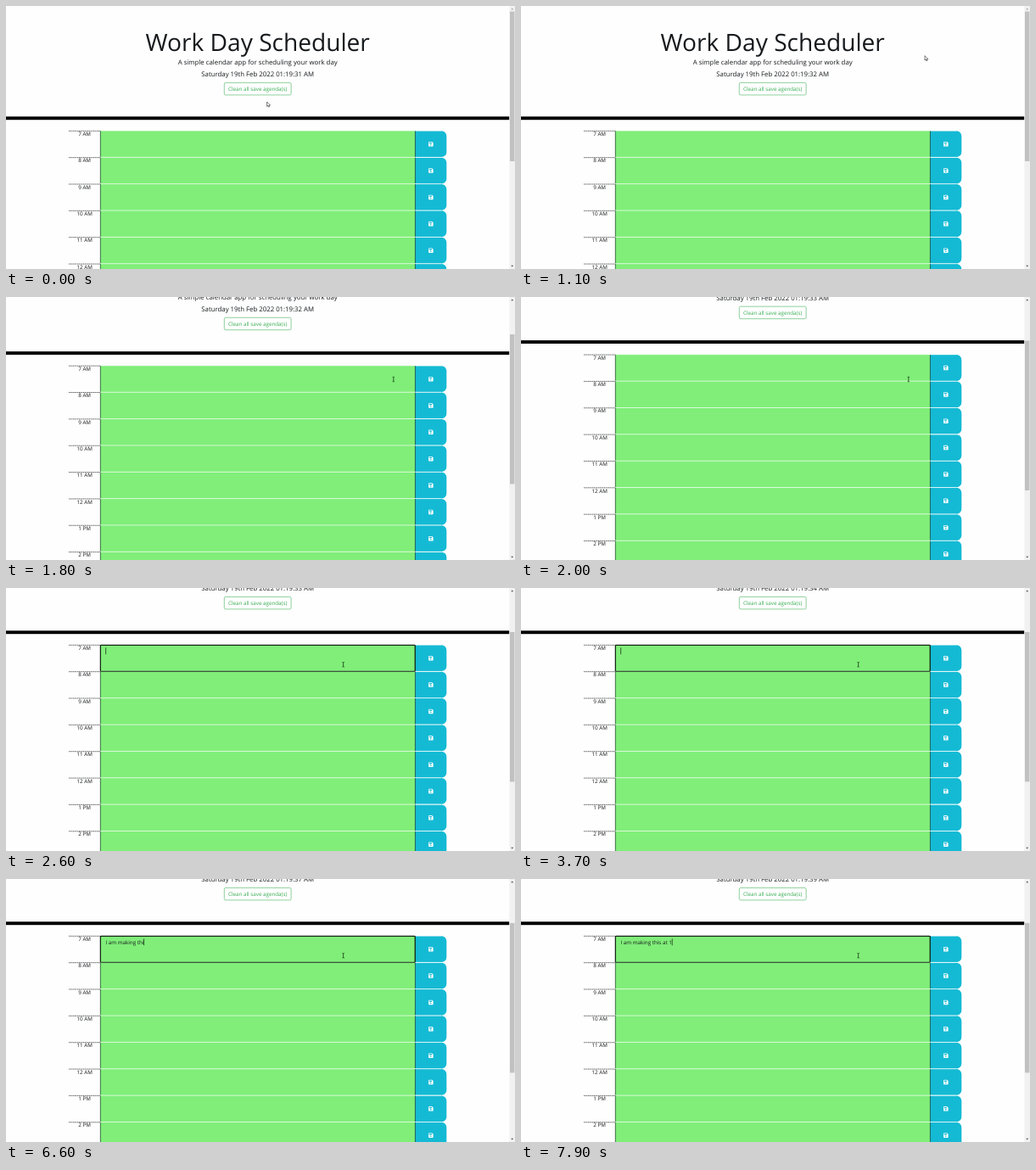
An HTML page for the animation above (8 s loop, 600x310 px).

```html
<!DOCTYPE html>
<html lang="en">
<head>
<meta charset="utf-8">
<title>Work Day Scheduler</title>
<style>
  html, body { margin: 0; width: 100%; height: 100%; overflow: hidden; background: #fefefe; }
  svg { display: block; width: 600px; height: 310px; }
  text { font-family: "Open Sans", "Noto Sans", sans-serif; fill: #16191c; white-space: pre; text-rendering: geometricPrecision; }
  .mid { text-anchor: middle; }
  .body { font-size: 6.25px; }
  .lead { font-size: 7.8125px; }
</style>
</head>
<body>
<svg id="stage" viewBox="0 0 600 310">
  <rect width="600" height="310" fill="#fefefe"/>
  <g id="page">
    <text class="mid" x="296.7" y="52.8" font-size="28.125">Work Day Scheduler</text>
    <text class="mid lead" x="296.7" y="68.7">A simple calendar app for scheduling your work day</text>
    <text class="mid lead" x="296.7" y="82.8" id="clock"></text>
    <rect x="257.3" y="90.4" width="78.8" height="14.5" rx="1.6" fill="none" stroke="#5fbd74" stroke-width=".7"/>
    <text class="mid body" x="296.7" y="100" style="fill:#37ad52">Clean all save agenda(s)</text>
    <rect y="130.3" width="593.4" height="3.9" fill="#000"/>
    <g id="rows"></g>
    <rect id="focus" x="111.4" y="147.4" width="370.8" height="30.8" rx=".8" fill="none" stroke="#10240f" stroke-width="1.1"/>
    <text id="entry" class="body" x="117.4" y="156.7"></text>
    <rect id="caret" y="150.4" width=".7" height="7.8" fill="#0c200b"/>
  </g>
  <rect x="593.4" width="6.6" height="310" fill="#f1f1f1"/>
  <rect id="thumb" x="594" width="5.4" height="176.5" fill="#c1c1c1"/>
  <path id="up" d="M595.2 4.3h3l-1.5-1.8z"/>
  <path d="M595.2 305.7h3l-1.5 1.8z" fill="#505050"/>
  <path id="arrow" d="M0 0V5.4L1.3 4.3 2.1 6.1 3 5.7 2.2 4H3.9Z" fill="#fff" stroke="#222" stroke-width=".6" stroke-linejoin="round"/>
  <path id="beam" d="M-1.2 -2.7H-.3L0 -2.4.3 -2.7H1.2M0 -2.4V2.4M-1.2 2.7H-.3L0 2.4.3 2.7H1.2" fill="none" stroke="#12300f" stroke-width=".75"/>
</svg>
<script>
const LOOP = 8000, ROW_TOP = 147, PITCH = 31.35, MAX_SCROLL = 80;
const LEFT = 111.1, RIGHT = 482.2;
const $ = id => document.getElementById(id);
const show = (el, on) => el.setAttribute('visibility', on ? 'visible' : 'hidden');

const hours = ['7 AM', '8 AM', '9 AM', '10 AM', '11 AM', '12 AM', '1 PM', '2 PM', '3 PM', '4 PM', '5 PM', '6 PM'];
$('rows').innerHTML = hours.map((hour, i) => `
  <g transform="translate(0 ${ROW_TOP + i * PITCH})">
    <path d="M74 .3H${LEFT}" stroke="#222" stroke-width=".7" stroke-dasharray="1.2 .5"/>
    <text class="mid body" x="92.6" y="6">${hour}</text>
    <rect x="${LEFT}" width="${RIGHT - LEFT}" height="${PITCH}" fill="#80ee79"/>
    <path d="M${RIGHT} .3h31.2a5.9 5.9 0 0 1 5.9 5.9V25.2a5.9 5.9 0 0 1-5.9 5.9h-31.2z" fill="#14bad4"/>
    <path d="M${LEFT} 0H${RIGHT + 31}" stroke="#fff" stroke-width=".8" opacity=".8"/>
    <path d="M${LEFT + .2} .3V31M${RIGHT + .2} .3V31" stroke="#0a2a1c" stroke-width=".65"/>
    <path d="M498.7 13h3.6l1.3 1.3v3.6a.6.6 0 0 1-.6.6h-4.3a.6.6 0 0 1-.6-.6v-4.3a.6.6 0 0 1 .6-.6z" fill="#fff"/>
    <path d="M498.9 13.8h3.1v1.4h-3.1z" fill="#14bad4"/>
    <circle cx="500.8" cy="16.8" r=".8" fill="#14bad4"/>
  </g>`).join('');

const clamp = v => Math.max(0, Math.min(1, v));
const smooth = u => u * u * (3 - 2 * u);

// time, x, y
const pointer = [[200, 307.6, 113], [1050, 476, 58.6], [1150, 476, 58.6], [1480, 456.8, 97], [2050, 456.8, 97], [2550, 397.6, 90.3]];
function pointerAt(t) {
  let [, x, y] = pointer[0];
  for (let i = 1; i < pointer.length; i++) {
    const [t0, x0, y0] = pointer[i - 1], [t1, x1, y1] = pointer[i];
    if (t < t0) break;
    const k = smooth(clamp((t - t0) / (t1 - t0)));
    x = x0 + (x1 - x0) * k;
    y = y0 + (y1 - y0) * k;
  }
  return [x, y];
}

const message = 'I am making this at 1';
const keyTimes = [4100, 4300, 4400, 4600, 4750, 4900, 5100, 5250, 5500, 5600, 5800, 6000,
                  6300, 6450, 6600, 6750, 6900, 7100, 7300, 7450, 7680];
const FOCUS_AT = 2570, BLINK = 530;

function draw(t) {
  const scroll = MAX_SCROLL * (1 - (1 - clamp((t - 1434) / 629)) ** 2);
  $('page').setAttribute('transform', `translate(0 ${-scroll})`);
  $('thumb').setAttribute('y', 6.5 + scroll * .567);
  $('up').setAttribute('fill', scroll > 0 ? '#505050' : '#a3a3a3');

  $('clock').textContent = `Saturday 19th Feb 2022 01:19:${31 + Math.floor((t + 100) / 1000)} AM`;

  const typed = keyTimes.filter(k => k <= t).length;
  const focused = t >= FOCUS_AT;
  const entry = $('entry');
  entry.textContent = message.slice(0, typed);
  $('caret').setAttribute('x', 117.4 + (typed ? entry.getComputedTextLength() : 0));
  show($('focus'), focused);
  show($('caret'), focused && (typed || Math.floor((t - FOCUS_AT) / BLINK) % 2 === 0));

  const [x, y] = pointerAt(t);
  const overText = x > LEFT && x < RIGHT && y > ROW_TOP - scroll;
  for (const id of ['arrow', 'beam']) {
    $(id).setAttribute('transform', `translate(${x} ${y})`);
    show($(id), (id === 'beam') === overText);
  }
}

const start = performance.now();
function tick() {
  draw((performance.now() - start) % LOOP);
  requestAnimationFrame(tick);
}
tick();
</script>
</body>
</html>
```
